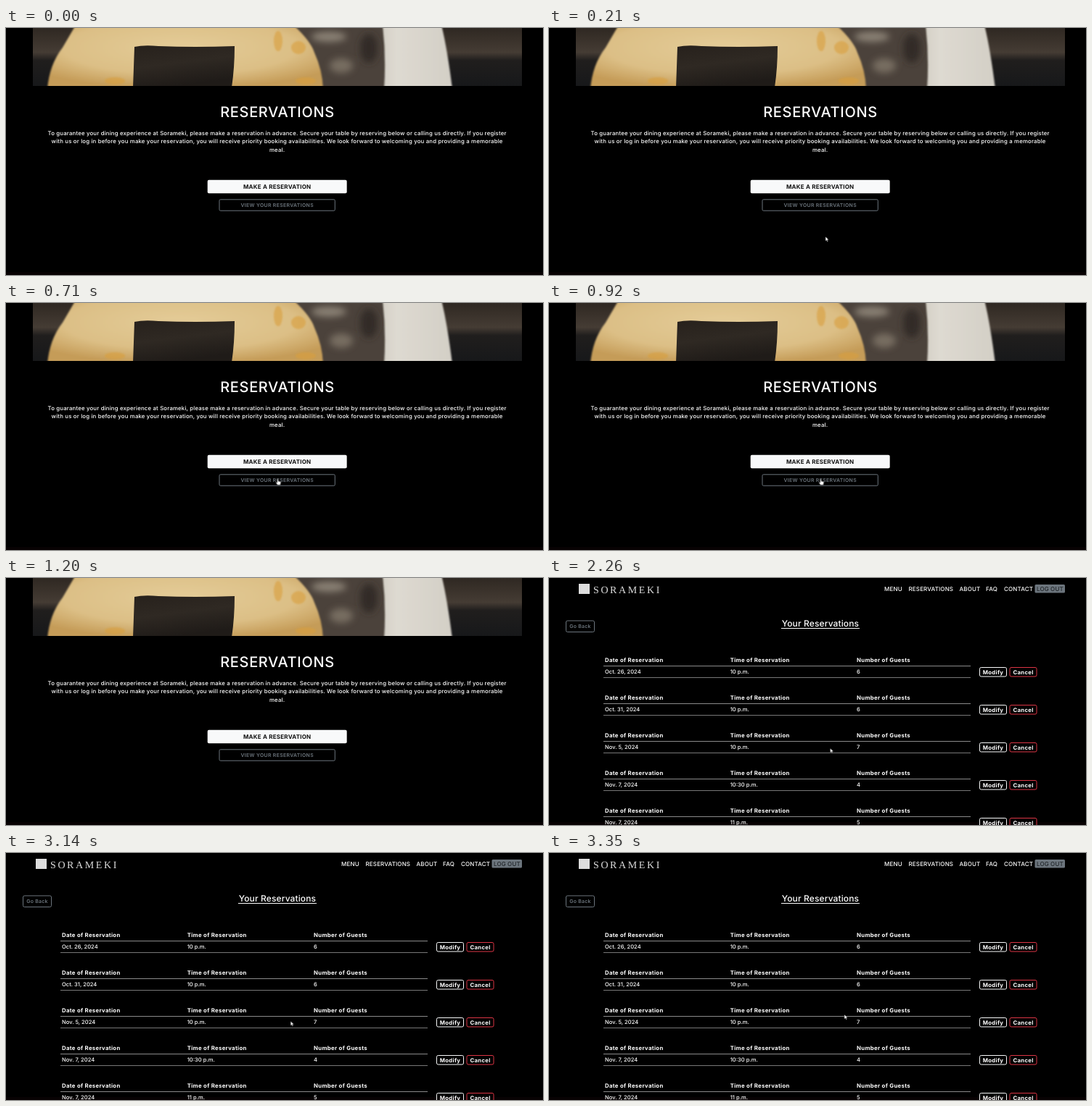
Animation of 740 by 341 pixels, one loop 3380 ms. Source, as an HTML page:

```html
<!DOCTYPE html>
<html lang="en">
<head>
<meta charset="utf-8">
<title>Reservations</title>
<style>
  html, body { margin: 0; width: 100%; height: 100%; overflow: hidden; background: #000; }
  svg { display: block; width: 740px; height: 341px; }
  text { font-family: Inter, "Open Sans", sans-serif; text-rendering: geometricPrecision; fill: #fff; white-space: pre; }
  .mid { text-anchor: middle; }
  .body { font-size: 7.8px; font-weight: 500; letter-spacing: .175px; }
  .heading { font-size: 20px; font-weight: 500; letter-spacing: .65px; }
  .primary { font-size: 8px; font-weight: 700; letter-spacing: .22px; fill: #111; }
  .secondary { font-size: 6.9px; font-weight: 600; letter-spacing: .34px; fill: #6c757d; }
  .brand { font-family: "Liberation Serif", serif; font-size: 14px; letter-spacing: 2.6px; fill: #ddd; }
  .nav { font-size: 8px; font-weight: 500; letter-spacing: .15px; }
  .logout { fill: #212529; }
  .title { font-size: 12px; font-weight: 500; letter-spacing: .12px; }
  .back { font-size: 7px; font-weight: 600; letter-spacing: .2px; fill: #6c757d; }
  .label { font-size: 7.8px; font-weight: 700; letter-spacing: .3px; }
  .value { font-size: 7.6px; font-weight: 500; }
  .action { font-size: 7.8px; font-weight: 700; letter-spacing: .25px; }

  .intro, .list, .cursor, .arrow, .hand { animation: 3380ms step-end infinite; }
  .intro { animation-name: intro; }
  .list { animation-name: list; }
  .cursor { animation-name: move; }
  .arrow { animation-name: arrow; }
  .hand { animation-name: hand; }

  @keyframes intro { 0% { opacity: 1 } 66.86%, 100% { opacity: 0 } }
  @keyframes list { 0% { opacity: 0 } 66.86%, 100% { opacity: 1 } }
  @keyframes arrow { 0% { opacity: 0 } 3.25% { opacity: 1 } 12.13% { opacity: 0 } 66.86%, 100% { opacity: 1 } }
  @keyframes hand { 0% { opacity: 0 } 12.13% { opacity: 1 } 30.76%, 100% { opacity: 0 } }
  @keyframes move {
    0%, 3.25% { transform: translate(385px, 314px) }
    6.21% { transform: translate(381px, 288px) }
    9.17% { transform: translate(378px, 262px) }
    12.13% { transform: translate(375.5px, 247.3px) }
    18.34% { transform: translate(375px, 245px) }
    21% { transform: translate(374.5px, 242.8px) }
    66.86% { transform: translate(387.5px, 235px) }
    77.51% { transform: translate(388.5px, 234.5px) }
    81.95% { transform: translate(389.3px, 234px) }
    92.89% { transform: translate(389.3px, 234px); animation-timing-function: steps(5, jump-both) }
    99.11%, 100% { transform: translate(407px, 223px) }
  }
</style>
</head>
<body>
<svg viewBox="0 0 740 341">
  <defs>
    <linearGradient id="backdrop" x2="0" y2="1">
      <stop offset="0" stop-color="#2f2822"/>
      <stop offset=".42" stop-color="#453c34"/>
      <stop offset=".56" stop-color="#201e1d"/>
      <stop offset="1" stop-color="#17181a"/>
    </linearGradient>
    <radialGradient id="rice" cx=".48" cy=".35" r=".65">
      <stop offset="0" stop-color="#e4cc98"/>
      <stop offset=".65" stop-color="#dcbf86"/>
      <stop offset="1" stop-color="#c59c58"/>
    </radialGradient>
    <linearGradient id="pale">
      <stop offset="0" stop-color="#cfcac0"/>
      <stop offset=".3" stop-color="#dedad1"/>
      <stop offset="1" stop-color="#d3cfc6"/>
    </linearGradient>
    <linearGradient id="nori" x2=".3" y2="1">
      <stop offset="0" stop-color="#27211c"/>
      <stop offset=".5" stop-color="#2f2923"/>
      <stop offset="1" stop-color="#1f1b18"/>
    </linearGradient>
    <clipPath id="banner"><path d="M37 0H711V80H37z"/></clipPath>
    <filter id="soft"><feGaussianBlur stdDeviation="1"/></filter>
    <filter id="hazy" x="-50%" y="-50%" width="200%" height="200%"><feGaussianBlur stdDeviation="5"/></filter>
  </defs>

  <path d="M0 337H740V341H0z" fill="#080203"/>

  <g class="intro">
    <g clip-path="url(#banner)">
      <path d="M37 0H711V80H37z" fill="url(#backdrop)"/>
      <path d="M505 -4H600Q608 28 615 84H505z" fill="url(#pale)" filter="url(#soft)"/>
      <path d="M390 -4H519Q524 40 521 84H430z" fill="#4b433b" filter="url(#soft)"/>
      <g filter="url(#hazy)">
        <ellipse cx="445" cy="12" rx="24" ry="7" fill="#8a8175"/>
        <ellipse cx="462" cy="52" rx="16" ry="10" fill="#776d60"/>
        <ellipse cx="500" cy="28" rx="12" ry="20" fill="#302a25"/>
      </g>
      <path d="M96 -4H396Q420 18 425 34Q436 58 437 84H57Q60 50 78 27z" fill="url(#rice)" filter="url(#soft)"/>
      <g fill="#d99f3c" opacity=".6" filter="url(#soft)">
        <ellipse cx="403" cy="27" rx="10" ry="9"/>
        <ellipse cx="150" cy="73" rx="14" ry="5"/>
        <ellipse cx="375" cy="18" rx="6" ry="14"/>
        <ellipse cx="413" cy="73" rx="14" ry="5"/>
      </g>
      <path d="M177 26Q190 23 210 25Q260 27 315 25Q315 55 311 82H175z" fill="url(#nori)"/>
    </g>
    <text class="mid heading" x="374" y="122.5">RESERVATIONS</text>
    <g class="mid body">
      <text x="373.6" y="147.6">To guarantee your dining experience at Sorameki, please make a reservation in advance. Secure your table by reserving below or calling us directly. If you register</text>
      <text x="373.6" y="159.2">with us or log in before you make your reservation, you will receive priority booking availabilities. We look forward to welcoming you and providing a memorable</text>
      <text x="373.6" y="170.8">meal.</text>
    </g>
    <rect x="277.7" y="209.7" width="192" height="18.6" rx="2" fill="#f8f9fa"/>
    <text class="mid primary" x="373.7" y="221.9">MAKE A RESERVATION</text>
    <rect x="294" y="236.8" width="159.3" height="15.4" rx="1.5" fill="none" stroke="#6c757d"/>
    <text class="mid secondary" x="373.7" y="247">VIEW YOUR RESERVATIONS</text>
  </g>

  <g class="list">
    <path d="M41 8H56V22H41z" fill="#ddd"/>
    <text class="brand" x="61" y="21.4">SORAMEKI</text>
    <g id="nav"></g>
    <rect x="23.5" y="59" width="39" height="15.5" rx="2" fill="none" stroke="#6c757d"/>
    <text class="mid back" x="43" y="69.2">Go Back</text>
    <text class="mid title" x="374" y="67">Your Reservations</text>
    <path d="M320 69.5H428" stroke="#fff"/>
    <g id="rows"></g>
  </g>

  <g class="cursor" stroke="#111" stroke-width=".5">
    <path class="arrow" d="M0 0V6.3L1.5 5L2.5 7.2L3.5 6.7L2.6 4.6H4.6z" fill="#fff"/>
    <path class="hand" d="M-.8 .6Q0 -.6 .8 .6V3L3.8 3.8Q4.5 4 4.3 5L3.6 8.4H-.4L-2.6 5.2Q-2.4 4 -.8 5z" fill="#fff"/>
  </g>
</svg>
<script>
  const text = (kind, x, y, words) => `<text class="${kind}" x="${x}" y="${y}">${words}</text>`;
  const line = (y, color) => `<path d="M75 ${y}H581" stroke="${color}"/>`;
  const button = (x, width, y, color, words) =>
    `<rect x="${x}" y="${y}" width="${width}" height="12.5" rx="2" fill="none" stroke="${color}"/>` +
    text("mid action", x + width / 2, y + 9, words);

  const links = [["MENU", 462], ["RESERVATIONS", 495.5], ["ABOUT", 565.5], ["FAQ", 602], ["CONTACT", 627]];
  document.getElementById("nav").innerHTML =
    links.map(([words, x]) => text("nav", x, 17.9, words)).join("") +
    '<rect x="669.5" y="9" width="41.5" height="11.5" rx="1.5" fill="#6c757d"/>' +
    text("mid nav logout", 690.4, 17.9, "LOG OUT");

  const columns = [77, 249.7, 424];
  const labels = ["Date of Reservation", "Time of Reservation", "Number of Guests"];
  const bookings = [
    ["Oct. 26, 2024", "10 p.m.", 6],
    ["Oct. 31, 2024", "10 p.m.", 6],
    ["Nov. 5, 2024", "10 p.m.", 7],
    ["Nov. 7, 2024", "10:30 p.m.", 4],
    ["Nov. 7, 2024", "11 p.m.", 5]
  ];
  document.getElementById("rows").innerHTML = bookings.map((booking, i) => {
    const y = 52 * i;
    return columns.map((x, c) =>
      text("label", x, y + 116.2, labels[c]) + text("value", x, y + 132.3, booking[c])).join("") +
      line(y + 121.5, "#8a8a8a") + line(y + 137.5, "#777") +
      button(593.5, 37, y + 123.5, "#f8f9fa", "Modify") +
      button(635, 37, y + 123.5, "#dc3545", "Cancel");
  }).join("");
</script>
</body>
</html>
```
